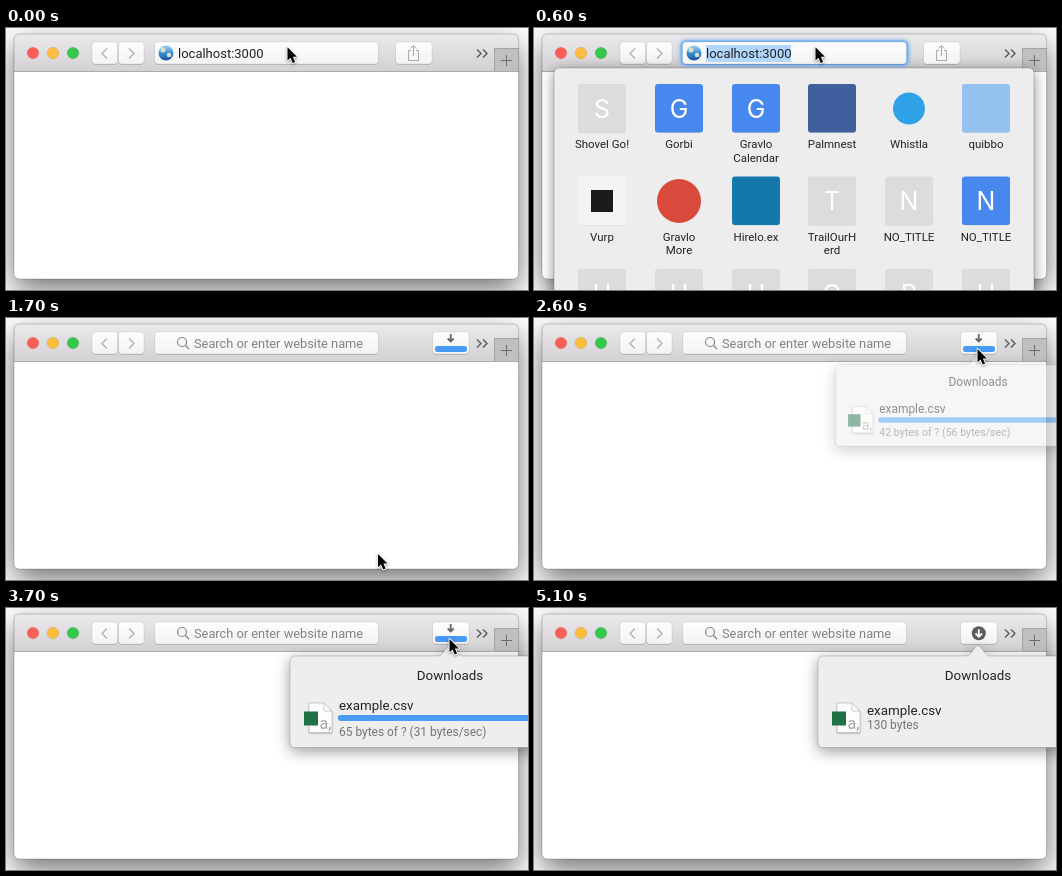
Recreate the animation shown at these times as an HTML page with a canvas. Size 522 by 262 pixels, loop 5.3 s.

```html
<!DOCTYPE html>
<html lang="en">
<head>
<meta charset="utf-8">
<title>Streaming download</title>
<style>
html, body { margin: 0; width: 100%; height: 100%; overflow: hidden; background: #fff; }
canvas { display: block; width: 522px; height: 262px; }
</style>
</head>
<body>
<canvas id="stage" width="522" height="262"></canvas>
<script>
const stage = document.getElementById('stage');
const buffer = stage.cloneNode().getContext('2d');
let ctx = stage.getContext('2d');

const LOOP = 5300, STEP = 100;
const ENTER = 800, RECEIVE = 1600, OPEN = 2400, LEAVE = 4500, DONE = 5000;
const SANS = 'Roboto, sans-serif';
const INK = '#222', MUTED = '#747474';

const clamp = v => Math.max(0, Math.min(1, v));
const ramp = (t, a, b) => clamp((t - a) / (b - a));
const ease = p => p * p * (3 - 2 * p);
const mix = (a, b, p) => a + (b - a) * p;

function layer(draw) {
  ctx.save();
  draw();
  ctx.restore();
}

// Draws a group off screen, then blends it as one picture.
function fade(alpha, draw) {
  if (!alpha) return;
  const front = ctx;
  ctx = buffer;
  ctx.clearRect(0, 0, stage.width, stage.height);
  layer(draw);
  ctx = front;
  layer(() => {
    ctx.globalAlpha = alpha;
    ctx.drawImage(buffer.canvas, 0, 0);
  });
}

function vertical(y, h, ...colors) {
  const g = ctx.createLinearGradient(0, y, 0, y + h);
  colors.forEach((c, i) => g.addColorStop(i / (colors.length - 1), c));
  return g;
}

function shadow(blur, dy, alpha) {
  ctx.shadowColor = `rgba(0,0,0,${alpha})`;
  ctx.shadowBlur = blur;
  ctx.shadowOffsetY = dy;
}

function paint(path, fill, stroke, width = 1) {
  if (fill) { ctx.fillStyle = fill; ctx.fill(path); }
  if (stroke) { ctx.strokeStyle = stroke; ctx.lineWidth = width; ctx.stroke(path); }
}

function rounded(x, y, w, h, r) {
  const path = new Path2D();
  path.roundRect(x, y, w, h, r);
  return path;
}

function box(x, y, w, h, r, fill, stroke) {
  paint(rounded(x, y, w, h, r), fill, stroke);
}

function disc(x, y, r, fill, stroke, width) {
  const path = new Path2D();
  path.arc(x, y, r, 0, Math.PI * 2);
  paint(path, fill, stroke, width);
}

// Strokes SVG path data placed at x, y.
function line(x, y, d, color, width = 1) {
  layer(() => {
    ctx.translate(x, y);
    paint(new Path2D(d), null, color, width);
  });
}

function text(s, x, y, size, color, align = 'left', face = SANS) {
  ctx.font = `${size}px ${face}`;
  ctx.fillStyle = color;
  ctx.textAlign = align;
  ctx.fillText(s, x, y);
}

function button(x, w) {
  box(x, 14.8, w, 22, 3.5, 'rgba(0,0,0,.16)');
  box(x, 14, w, 22, 3.5, vertical(14, 22, '#fdfdfd', '#f3f3f3'), 'rgba(0,0,0,.07)');
}

function drawWindow() {
  const frame = rounded(8, 6, 504.5, 245, 5);
  layer(() => {
    shadow(30, 11, 0.56);
    paint(frame, '#fff');
  });
  layer(() => {
    ctx.clip(frame);
    box(8, 6, 505, 37, 0, vertical(6, 37, '#ebe9eb', '#d3d1d3'));
    box(488.5, 20.5, 30, 23, 0, '#c1bfc1', '#a5a3a5');
    box(8, 43, 505, 1, 0, '#acaaac');
  });
  paint(frame, null, 'rgba(0,0,0,.2)');

  ['#fc5d57', '#fdbc40', '#34c84a'].forEach((color, i) =>
    disc(27 + 20 * i, 25, 5.8, color, 'rgba(0,0,0,.12)', 0.7));

  button(86, 25.5);
  button(112.5, 25.5);
  line(98.5, 25.5, 'M2.5-5l-5 5l5 5', '#b0b0b0', 1.3);
  line(125.5, 25.5, 'M-2.5-5l5 5l-5 5', '#b0b0b0', 1.3);
  for (const x of [471, 477]) line(x, 25.5, 'M0-4l4 4l-4 4', '#555', 1.3);
  line(500.5, 32.5, 'M-5.5 0h11M0-5.5v11', '#6d6d6d');
}

function drawGlobe() {
  disc(160, 25, 7.5, vertical(17, 16, '#a9d4f2', '#3e8fd4', '#174f94'));
  disc(157, 22, 2.5, '#d3e3c8');
  disc(163, 27, 2.2, '#d3e3c8');
}

function drawAddress(t) {
  const focused = t >= STEP && t < ENTER;
  if (focused) layer(() => {
    ctx.shadowColor = '#62a9f4';
    ctx.shadowBlur = 4;
    box(146.5, 12.5, 228, 25, 5, '#78b4f4');
  });
  button(148.5, 224);

  if (t < ENTER) {
    drawGlobe();
    if (focused) box(172, 17, 85, 17, 0, '#b2d6fc');
    text('localhost:3000', 172, 30, 13, INK);
  } else if (t < RECEIVE) {
    text('localhost', 261, 30, 13, INK, 'center');
    line(360, 25.5, 'M-5-5l10 10M5-5l-10 10', '#6e6e6e', 1.2);
    box(149, 34, 54 * Math.sqrt(ramp(t, 700, 1100)), 2.4, 1, '#2f8fee');
  } else {
    disc(176, 24, 4.5, null, '#858585', 1.2);
    line(179.2, 27.2, 'M0 0l3.8 3.8', '#858585', 1.3);
    text('Search or enter website name', 188, 30, 12.8, '#828282');
  }
}

function drawShare() {
  button(389.5, 36.5);
  line(407.5, 17.5, 'M-2.5 5h-2.5v10h10v-10h-2.5M0 10.5v-10.5M-3 3l3-3l3 3', '#a9a9a9');
}

function drawDownloadButton(done) {
  button(426.5, 36.5);
  if (done) {
    disc(444.8, 25.2, 7, '#5b5b5b');
    line(444.8, 25.2, 'M0-4v7M-3.3 .3l3.3 3.3l3.3-3.3', '#fff', 1.8);
  } else {
    line(444.7, 16, 'M0 0v7M-3 4.5l3 3l3-3', '#666', 1.8);
    box(429, 28, 32, 6, 2.5, '#479af6');
  }
}

const GRAY = '#dcdcdc', BLUE = '#4788ef';
const tile = (label, fill, letter) => ({ label, fill, letter });
const tiles = [
  tile('Shovel Go!', GRAY, 'S'),
  tile('Gorbi', BLUE, 'G'),
  tile('Gravlo\nCalendar', BLUE, 'G'),
  tile('Palmnest', '#3f5f9f'),
  { label: 'Whistla', dot: '#2fa2e8', radius: 16 },
  tile('quibbo', '#93c2f0'),
  { label: 'Vurp', fill: '#f4f4f4', mark: '#1b1b1b' },
  { label: 'Gravlo\nMore', dot: '#d94a3d', radius: 22 },
  tile('Hirelo.ex', '#1478ad'),
  tile('TrailOurH\nerd', GRAY, 'T'),
  tile('NO_TITLE', GRAY, 'N'),
  tile('NO_TITLE', BLUE, 'N'),
  ...[...'UUUOPU'].map(letter => tile('', GRAY, letter)),
];

function drawTile({ label, fill, letter, dot, radius, mark }, i) {
  const x = Math.round(68 + (i % 6) * 76.8);
  const y = 56 + Math.floor(i / 6) * 92.5;
  if (dot) disc(x, y + 24.5, radius, dot);
  if (fill) {
    box(x - 24, y + 0.6, 48, 48.5, 3, 'rgba(0,0,0,.12)');
    box(x - 24, y, 48, 48.5, 3, fill);
  }
  if (mark) box(x - 11, y + 13.5, 22, 22, 0, mark);
  if (letter) text(letter, x, y + 33.5, 25, '#fff', 'center', 'Inter, sans-serif');
  label.split('\n').forEach((s, n) => text(s, x, y + 64 + n * 13.5, 11.5, INK, 'center'));
}

function drawFavorites() {
  const panel = rounded(20, 40, 480, 260, 5);
  layer(() => {
    shadow(14, 3, 0.45);
    paint(panel, '#ededed');
  });
  paint(panel, null, 'rgba(0,0,0,.18)');
  tiles.forEach(drawTile);
}

function drawFile() {
  const page = new Path2D('M303 95h15l8 8v21.5h-23z');
  layer(() => {
    shadow(2, 1, 0.3);
    paint(page, '#fdfdfd');
  });
  paint(page, null, '#bcbcbc', 0.8);
  line(318, 95, 'M0 0v8h8', '#bcbcbc', 0.8);
  text('a,', 313.5, 121, 16, '#a3a3a3');
  box(298, 103.5, 14, 14, 0, '#1f7245');
}

function progressLabel(t) {
  const chunks = Math.max(0, Math.floor((t - 2600) / 400));
  const bytes = Math.round(42 + 11.5 * chunks);
  const rate = Math.round(31 + 25 * 0.04 ** chunks);
  return `${bytes} bytes of ? (${rate} bytes/sec)`;
}

function drawDownloads(t, done) {
  const scale = 1 - 0.44 * (1 - ramp(t, OPEN, OPEN + 400)) ** 2;
  ctx.translate(444, 37);
  ctx.scale(scale, scale);
  ctx.translate(-444, -37);

  const panel = new Path2D(
    'M289 48H432Q435 48 437 45L442 38.5Q444 36.5 446 38.5L451 45Q453 48 456 48' +
    'H604V139.5H289Q284 139.5 284 134.5V53Q284 48 289 48Z');
  layer(() => {
    shadow(15, 4, 0.4);
    paint(panel, '#eee');
  });
  paint(panel, null, 'rgba(0,0,0,.2)', 0.8);

  text('Downloads', 444, 72, 13.4, INK, 'center');
  drawFile();
  text('example.csv', 333, done ? 107 : 102, 13.4, INK);
  if (!done) box(332, 107, 250, 6, 2.5, '#4a9cf7');
  text(done ? '130 bytes' : progressLabel(t), 333, done ? 121 : 128, 11.95, MUTED);
}

// The pointer rests at each stop and glides there in the last 300 ms.
const GLIDE = 300;
const stops = [
  { at: 0, x: 281.5, y: 19.3 },
  { at: 1100, x: 332, y: 82 },
  { at: 1400, x: 372, y: 236 },
  { at: 2100, x: 443.5, y: 31 },
  { at: 4300, x: 400.5, y: 234 },
];

function drawCursor(t) {
  const { x, y } = stops.reduce((from, to) => {
    const p = ease(ramp(t, to.at - GLIDE, to.at));
    return { x: mix(from.x, to.x, p), y: mix(from.y, to.y, p) };
  });
  layer(() => {
    ctx.translate(x, y);
    ctx.lineJoin = 'round';
    const arrow = new Path2D('M0 0V13.2L3 10.4L5.2 15.6L7.6 14.6L5.4 9.5H9.5Z');
    layer(() => {
      shadow(2.5, 1, 0.4);
      paint(arrow, null, '#fff', 1.8);
    });
    paint(arrow, '#000');
  });
}

function render(t) {
  const done = t >= DONE;
  box(0, 0, stage.width, stage.height, 0, '#fff');
  drawWindow();
  fade(ramp(t, 100, 400) * (1 - ramp(t, 700, 1000)), drawFavorites);
  drawAddress(t);
  if (t < RECEIVE) drawShare();
  else drawDownloadButton(done);
  fade(ramp(t, OPEN, OPEN + 400), () => drawDownloads(t, done));
  if (t < LEAVE) drawCursor(t);
}

function frame(now) {
  render(Math.floor((now % LOOP) / STEP) * STEP);
  requestAnimationFrame(frame);
}
requestAnimationFrame(frame);
</script>
</body>
</html>
```
